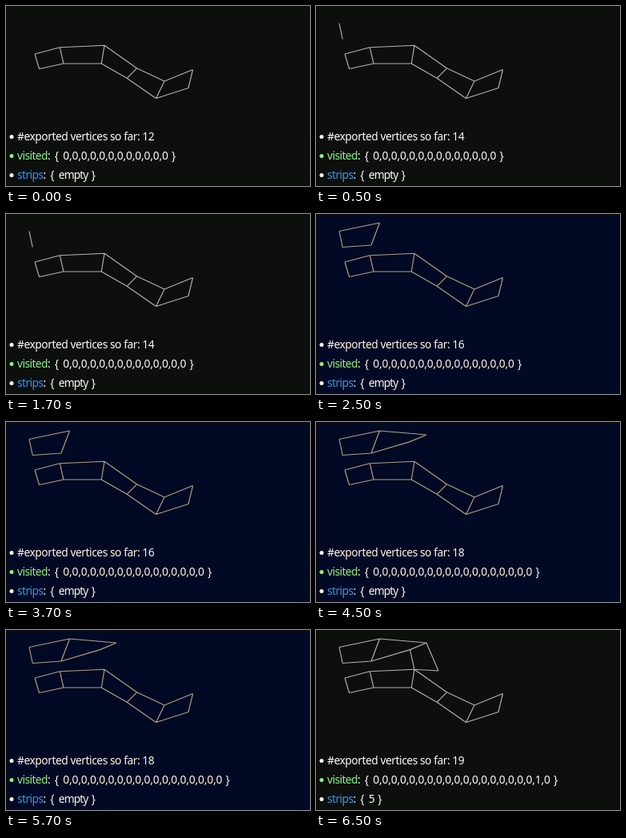
An HTML page for the animation above (8 s loop, 380x225 px).

```html
<!DOCTYPE html>
<html lang="en">
<head>
<meta charset="utf-8">
<title>Strip export</title>
<style>
html, body { margin: 0; width: 100%; height: 100%; overflow: hidden; background: #0c0f0b; }
svg { display: block; width: 380px; height: 225px; }
text { font: 13.8px "Noto Sans", "Open Sans", sans-serif; fill: var(--ink); white-space: pre; }
.line { letter-spacing: -.46px; }
.name { letter-spacing: -.58px; }
.punct { letter-spacing: .8px; }
.list { letter-spacing: -.17px; }
.word { letter-spacing: -.9px; }
.green { fill: var(--green); }
.blue { fill: var(--blue); }
#mesh { fill: none; stroke: var(--wire); stroke-width: 1.15; stroke-linejoin: round; }
</style>
</head>
<body>
<svg id="stage" viewBox="0 0 380 225">
  <rect width="380" height="225" fill="#0c0f0b"/>
  <rect x="1" y="1" width="378.5" height="223.5" fill="var(--back)"/>
  <path id="mesh"/>
  <circle cx="7" cy="163.5" r="2.5" fill="var(--ink)"/>
  <circle cx="7" cy="187.5" r="2.5" class="green"/>
  <circle cx="7" cy="211.5" r="2.5" fill="var(--ink)"/>
  <text class="line" x="14" y="168" id="count"></text>
  <text x="14" y="192"><tspan class="name green">visited</tspan><tspan class="punct">: { </tspan><tspan class="list" id="visited"></tspan><tspan class="punct"> }</tspan></text>
  <text x="14" y="216"><tspan class="name blue">strips</tspan><tspan class="punct">: { </tspan><tspan class="word" id="strips"></tspan><tspan class="punct"> }</tspan></text>
</svg>
<script>
const LOOP = 8000;
const el = id => document.getElementById(id);

const neutral = { back: '#0c0f0b', ink: '#fcfcfc', wire: '#b2b2b0', green: '#84f584', blue: '#3794f5' };
const night = { back: '#020924', ink: '#fff6e4', wire: '#aea183', green: '#92f070', blue: '#3a98dc' };

// Each strip is a list of rungs: [x1, y1, x2, y2].
const lower = [
  [36, 60, 41.5, 78.5], [67.3, 51.7, 72, 72], [123, 49.3, 119.3, 72],
  [163.5, 77.8, 151.2, 90.3], [198, 94, 187.5, 115.5], [233.5, 79.5, 228, 102.5]
];
const upper = [[29, 21.5, 33.2, 41.5], [79.5, 11, 69, 39], [138, 16, 117.5, 24.6], [153, 51, 123, 49.3]];

const steps = [
  { at: 0, rungs: 0, count: 12, look: neutral },
  { at: 500, rungs: 1, count: 14, look: neutral },
  { at: 2500, rungs: 2, count: 16, look: night },
  { at: 4500, rungs: 3, count: 18, look: night },
  { at: 6500, rungs: 4, count: 19, look: neutral, tail: ',1,0', strips: '5' }
];

function stripPath(rungs) {
  return rungs.map(([x1, y1, x2, y2], i) => {
    let d = `M${x1} ${y1}L${x2} ${y2}`;
    if (i) {
      const [a, b, c, e] = rungs[i - 1];
      d += `M${a} ${b}L${x1} ${y1}M${c} ${e}L${x2} ${y2}`;
    }
    return d;
  }).join('');
}

let shown = null;
function render(time) {
  const step = steps.filter(s => s.at <= time % LOOP).pop();
  if (step === shown) return;
  shown = step;
  for (const key in step.look) el('stage').style.setProperty('--' + key, step.look[key]);
  el('mesh').setAttribute('d', stripPath(lower) + stripPath(upper.slice(0, step.rungs)));
  el('count').textContent = `#exported vertices so far: ${step.count}`;
  const zeros = Math.min(step.count, 18);
  el('visited').textContent = Array(zeros).fill(0).join(',') + (step.tail || '');
  el('strips').textContent = step.strips || 'empty';
}

const start = performance.now();
function tick() {
  render(performance.now() - start);
  requestAnimationFrame(tick);
}
tick();
</script>
</body>
</html>
```
